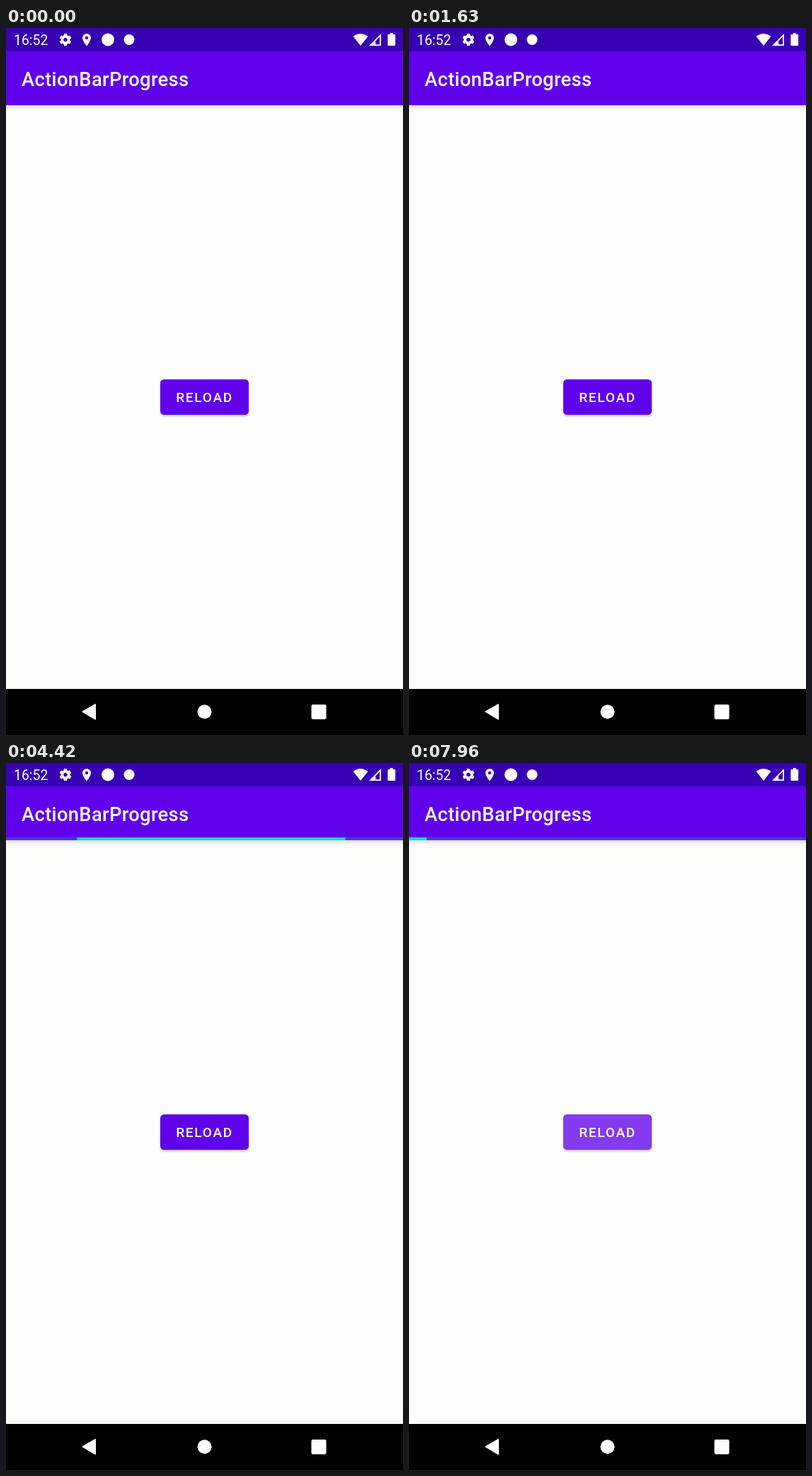
Animation, 561 px wide and 998 px high, one loop 8000 ms. Source, as an HTML page:

```html
<!DOCTYPE html>
<html lang="en">
<head>
<meta charset="utf-8">
<title>Action bar progress</title>
<style>
  html, body { margin: 0; width: 100%; height: 100%; overflow: hidden; background: #fdfdfc; }
  svg { display: block; width: 100%; height: 100%; }
  text { font-family: Roboto, sans-serif; fill: #fff; }
  .medium { font-weight: 500; }
  .bar, .ripple { transform-box: fill-box; transform-origin: center; }

  /* The script moves the clocks --phase and --age; the keyframes do the easing. */
  .bar {
    fill: #12d8c9;
    animation: 2027ms linear infinite both paused;
    animation-delay: calc(var(--phase) * -1ms);
  }
  .lead { animation-name: lead-move, lead-size; }
  .tail { animation-name: tail-move, tail-size; }

  @keyframes tail-move {
    0%, 20% { translate: -814.4px; animation-timing-function: cubic-bezier(.5, 0, .701732, .495819); }
    59.15% { translate: -345px; animation-timing-function: cubic-bezier(.302435, .381352, .55, .956352); }
    100% { translate: 311px; }
  }
  @keyframes tail-size {
    0%, 36.65% { scale: .1 1; animation-timing-function: cubic-bezier(.334731, .12482, .785844, 1); }
    68.325% { scale: .82685 1; animation-timing-function: cubic-bezier(.225737, 0, .233654, .62902); }
    100% { scale: .1 1; }
  }
  @keyframes lead-move {
    0% { translate: -307.9px; animation-timing-function: cubic-bezier(.15, 0, .515058, .409685); }
    25% { translate: -96.7px; animation-timing-function: cubic-bezier(.31033, .284058, .8, .733712); }
    48.35% { translate: 165.5px; animation-timing-function: cubic-bezier(.4, .627035, .6, .902026); }
    100% { translate: 658.6px; }
  }
  @keyframes lead-size {
    0% { scale: .1 1; animation-timing-function: cubic-bezier(.205028, .057051, .57661, .453971); }
    19.15% { scale: .57138 1; animation-timing-function: cubic-bezier(.152313, .196432, .648374, 1.004315); }
    44.15% { scale: .90995 1; animation-timing-function: cubic-bezier(.257759, -.003163, .211762, 1.38179); }
    100% { scale: .1 1; }
  }

  .ripple {
    fill: #fff;
    animation: ripple-fade 375ms linear both paused, ripple-grow 225ms cubic-bezier(.4, 0, .2, 1) both paused;
    animation-delay: calc(var(--age) * -1ms);
  }
  @keyframes ripple-fade {
    0%, 100% { opacity: 0; }
    20%, 60% { opacity: .23; }
  }
  @keyframes ripple-grow {
    from { scale: .55; }
    to { scale: 1; }
  }
</style>
</head>
<body>
<svg viewBox="0 0 561 998" preserveAspectRatio="none">
  <defs>
    <linearGradient id="shade" x2="0" y2="1">
      <stop stop-color="#000" stop-opacity=".13"/>
      <stop offset="1" stop-color="#000" stop-opacity="0"/>
    </linearGradient>
    <clipPath id="button"><rect x="218" y="496" width="125" height="50" rx="5.5"/></clipPath>
    <filter id="lift" x="-10%" y="-20%" width="120%" height="150%">
      <feDropShadow dx="0" dy="2" stdDeviation="1.6" flood-opacity=".24"/>
    </filter>
  </defs>

  <rect width="561" height="998" fill="#fdfdfc"/>
  <rect y="109" width="561" height="7" fill="url(#shade)"/>
  <rect y="32" width="561" height="77" fill="#6000ea"/>
  <rect width="561" height="32.5" fill="#3700b3"/>

  <g fill="#fff">
    <text x="11" y="24" font-size="19.4">16:52</text>
    <g transform="translate(84 16.5)">
      <circle r="4.6" fill="none" stroke="#fff" stroke-width="3.7"/>
      <g id="teeth">
        <path id="tooth" d="M-2 -8.5h4l.7 3.5h-5.4z"/>
      </g>
    </g>
    <path fill-rule="evenodd" d="M114 8a6 6 0 0 0-6 6c0 4.500 6 11.500 6 11.500s6-7 6-11.500a6 6 0 0 0-6-6zm0 3.800a2.200 2.200 0 1 1 0 4.400a2.200 2.200 0 0 1 0-4.400z"/>
    <circle cx="144" cy="16.500" r="9"/>
    <circle cx="174" cy="16.500" r="7.500"/>

    <path d="M490.500 11.800Q501 4.200 511.500 11.800L501 25z"/>
    <path fill-rule="evenodd" d="M530 8v17h-17zm-1.800 4.300l-6 6v5h6z"/>
    <path d="M542.800 7h4v2h2.200q1.200 0 1.200 1.200v13.600q0 1.200-1.200 1.200h-8.400q-1.200 0-1.200-1.200v-13.600q0-1.200 1.200-1.200h2.200z"/>
  </g>

  <text class="medium" x="22" y="81.500" font-size="27.300" letter-spacing=".34">ActionBarProgress</text>

  <g id="progress" visibility="hidden">
    <rect y="105" width="561" height="4" fill="#03dac5" opacity=".26"/>
    <rect class="bar lead" x="56.1" y="105" width="448.8" height="4"/>
    <rect class="bar tail" x="56.1" y="105" width="448.8" height="4"/>
  </g>

  <rect x="218" y="496" width="125" height="50" rx="5.5" fill="#6000ea" filter="url(#lift)"/>
  <g clip-path="url(#button)">
    <circle class="ripple" cx="280.5" cy="521" r="67.500"/>
  </g>
  <text class="medium" x="240.200" y="528" font-size="19.100" letter-spacing="1.700">RELOAD</text>

  <rect y="933" width="561" height="65"/>
  <g fill="#fff">
    <path d="M108.500 965L126 955v20.500z" stroke="#fff" stroke-width="2" stroke-linejoin="round"/>
    <circle cx="280.500" cy="965.300" r="10"/>
    <rect x="431.500" y="955" width="21" height="20.700" rx="2"/>
  </g>
</svg>
<script>
  const LOOP = 8000;
  const RIPPLE = 375;
  const presses = [1640, 7805];
  const loads = [{ from: 1681, to: 6700 }, { from: 7880, to: LOOP }];

  const root = document.documentElement;
  const progress = document.getElementById('progress');
  const teeth = document.getElementById('teeth');
  const tooth = document.getElementById('tooth');

  for (let angle = 60; angle < 360; angle += 60) {
    const copy = tooth.cloneNode();
    copy.removeAttribute('id');
    copy.setAttribute('transform', `rotate(${angle})`);
    teeth.append(copy);
  }

  function draw(now) {
    const t = now % LOOP;
    const load = loads.find(({ from, to }) => t >= from && t < to);
    const press = presses.find(p => t >= p && t < p + RIPPLE);
    progress.setAttribute('visibility', load ? 'visible' : 'hidden');
    root.style.setProperty('--phase', load ? t - load.from : 0);
    root.style.setProperty('--age', press === undefined ? RIPPLE : t - press);
  }

  const start = performance.now();
  function tick() {
    draw(performance.now() - start);
    requestAnimationFrame(tick);
  }
  tick();
</script>
</body>
</html>
```
